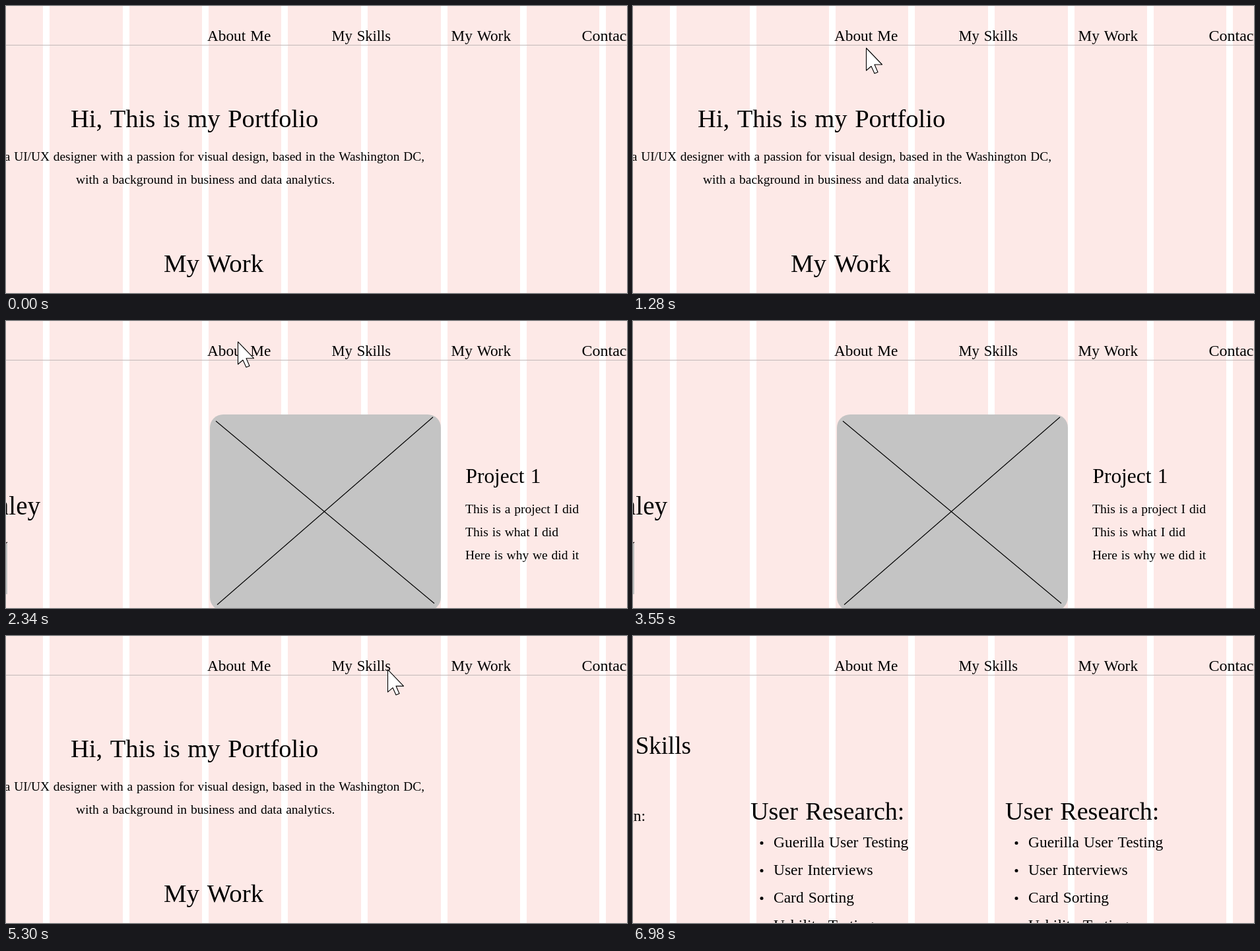
An HTML page with a canvas that plays this animation: 941x436 px, repeating every 8000 ms.

```html
<!DOCTYPE html>
<html lang="en">
<head>
<meta charset="utf-8">
<title>Portfolio prototype</title>
<style>
html, body { margin: 0; width: 100%; height: 100%; overflow: hidden; background: #fff; }
canvas { display: block; width: 941px; height: 436px; }
</style>
</head>
<body>
<canvas id="stage" width="941" height="436"></canvas>
<script>
const W = 941, H = 436, LOOP = 8000, STEP = 67.1;
const ctx = document.getElementById('stage').getContext('2d');
const arrowShape = new Path2D('M0 0 V34 L7.5 27.5 L12.5 38.5 L17.5 36.5 L12.5 25 H24 Z');
const handShape = new Path2D(
  'M-2.5 25 V-1.5 C-2.5 -5.5 3.5 -5.5 3.5 -1.5 V9 C3.5 5 9.5 5 9.5 9.5 ' +
  'C9.5 6 15.5 6.5 15.5 11 C16 8 20.5 8.5 20.5 13 V25 C20.5 30 18 33 17 36 ' +
  'C15 42 4 42 1 37 C-3 32 -6 29 -10 26 C-15 21 -11 17 -7 20 Z');
const handCreases = new Path2D('M3.5 8 V18 M9.5 9 V18 M15.5 11 V19');

function text(str, x, y, size, align = 'left') {
  ctx.font = `${size}px "Liberation Serif", "Times New Roman", serif`;
  ctx.wordSpacing = `${size * 0.05}px`;
  ctx.textAlign = align;
  ctx.fillStyle = '#000';
  ctx.fillText(str, x, y);
}

function line(x1, y1, x2, y2) {
  ctx.beginPath();
  ctx.moveTo(x1, y1);
  ctx.lineTo(x2, y2);
  ctx.stroke();
}

function drawBase() {
  ctx.fillStyle = '#fde9e7';
  ctx.fillRect(0, 0, W, H);
  ctx.fillStyle = '#fff';
  for (const left of [56, 538]) {
    for (const offset of [0, 121, 241, 361]) ctx.fillRect(left + offset, 0, 10, H);
  }
  ctx.fillStyle = '#c2b9b9';
  ctx.fillRect(0, 59, W, 1);
  text('About Me', 305, 52.5, 23.3);
  text('My Skills', 493.5, 52.5, 22.6);
  text('My Work', 674.5, 52.5, 23.3);
  text('Contact', 872.5, 52.5, 24);
}

function drawHome() {
  text('Hi, This is my Portfolio', 98, 184, 38.6);
  text('I am a UI/UX designer with a passion for visual design, based in the Washington DC,',
    634, 234.5, 19.4, 'right');
  text('with a background in business and data analytics.', 106, 269.5, 19.5);
  text('My Work', 239, 403.5, 38.9);
}

function drawAbout() {
  text('Mira Tenley', 52, 294, 39, 'right');
  ctx.fillStyle = '#c4c4c4';
  ctx.fillRect(0, 338, 2, 77);
  ctx.beginPath();
  ctx.roundRect(309, 142, 350, 298, 20);
  ctx.fill();
  ctx.strokeStyle = '#000';
  ctx.lineWidth = 1.1;
  line(-4, 340, 2, 336);
  line(318, 152, 649, 429);
  line(647, 146, 320, 431);
  text('Project 1', 696.5, 245.5, 31.4);
  text('This is a project I did', 696, 291.5, 19.6);
  text('This is what I did', 696, 326.5, 19.6);
  text('Here is why we did it', 696, 361.5, 19.5);
}

function drawSkills() {
  text('My Skills', 88, 178.5, 37, 'right');
  text('Design:', 19, 281, 23.4, 'right');
  const items = ['Guerilla User Testing', 'User Interviews', 'Card Sorting', 'Usbility Testing'];
  for (const x of [178, 564]) {
    text('User Research:', x, 278.5, 38.1);
    items.forEach((item, i) => {
      const y = 320.5 + i * 42;
      text(item, x + 35, y, 23.5);
      ctx.beginPath();
      ctx.arc(x + 17, y - 6, 2.5, 0, 7);
      ctx.fill();
    });
  }
}

function cursor(x, y, isHand) {
  ctx.save();
  ctx.translate(x, y);
  ctx.fillStyle = '#fff';
  ctx.strokeStyle = '#000';
  ctx.lineWidth = 1.1;
  ctx.lineJoin = 'round';
  const shape = isHand ? handShape : arrowShape;
  ctx.fill(shape);
  ctx.stroke(shape);
  if (isHand) ctx.stroke(handCreases);
  ctx.restore();
}

const mix = (a, b, p) => a + (b - a) * p;
const clamp = p => Math.min(1, Math.max(0, p));
const easeOut = (p, power) => 1 - (1 - p) ** power;

// Each visit: enter from below, hover a menu link, click, drift up and leave.
const visits = [
  { enter: 460, rest: 1210, settled: 1550, press: 2145, leave: 2475,
    from: [353.5, 64], to: [352, 48], top: 19, page: drawAbout, end: 4555 },
  { enter: 4685, rest: 5300, settled: 5500, press: 6025, leave: 6375,
    from: [578.5, 51], to: [571, 47], top: 18, page: drawSkills, end: LOOP }
];

function drawCursor(v, t) {
  if (t < v.enter || t >= v.leave) return;
  const [ax, ay] = v.from, [bx, by] = v.to;
  if (t < v.rest + 60) {
    const p = clamp((t - v.enter) / (v.rest - v.enter));
    cursor(mix(759, ax, easeOut(p, 3.14)), mix(430, ay, easeOut(p, 1.87)), false);
  } else if (t < v.press) {
    const p = easeOut(clamp((t - v.rest) / (v.settled - v.rest)), 2);
    cursor(Math.round(mix(ax, bx, p)), Math.round(mix(ay, by, p)), true);
  } else {
    const p = clamp((t - v.press) / (v.leave - v.press - STEP));
    cursor(bx - 0.5, mix(by - 0.5, v.top, p * p), false);
  }
}

function render(now) {
  const t = now % LOOP;
  const visit = visits.find(v => t < v.end);
  const stepped = Math.floor((t + 10) / STEP) * STEP - 8;
  drawBase();
  (t >= visit.press ? visit.page : drawHome)();
  drawCursor(visit, stepped);
}

const start = performance.now();
function tick() {
  render(performance.now() - start);
  requestAnimationFrame(tick);
}
tick();
</script>
</body>
</html>
```
